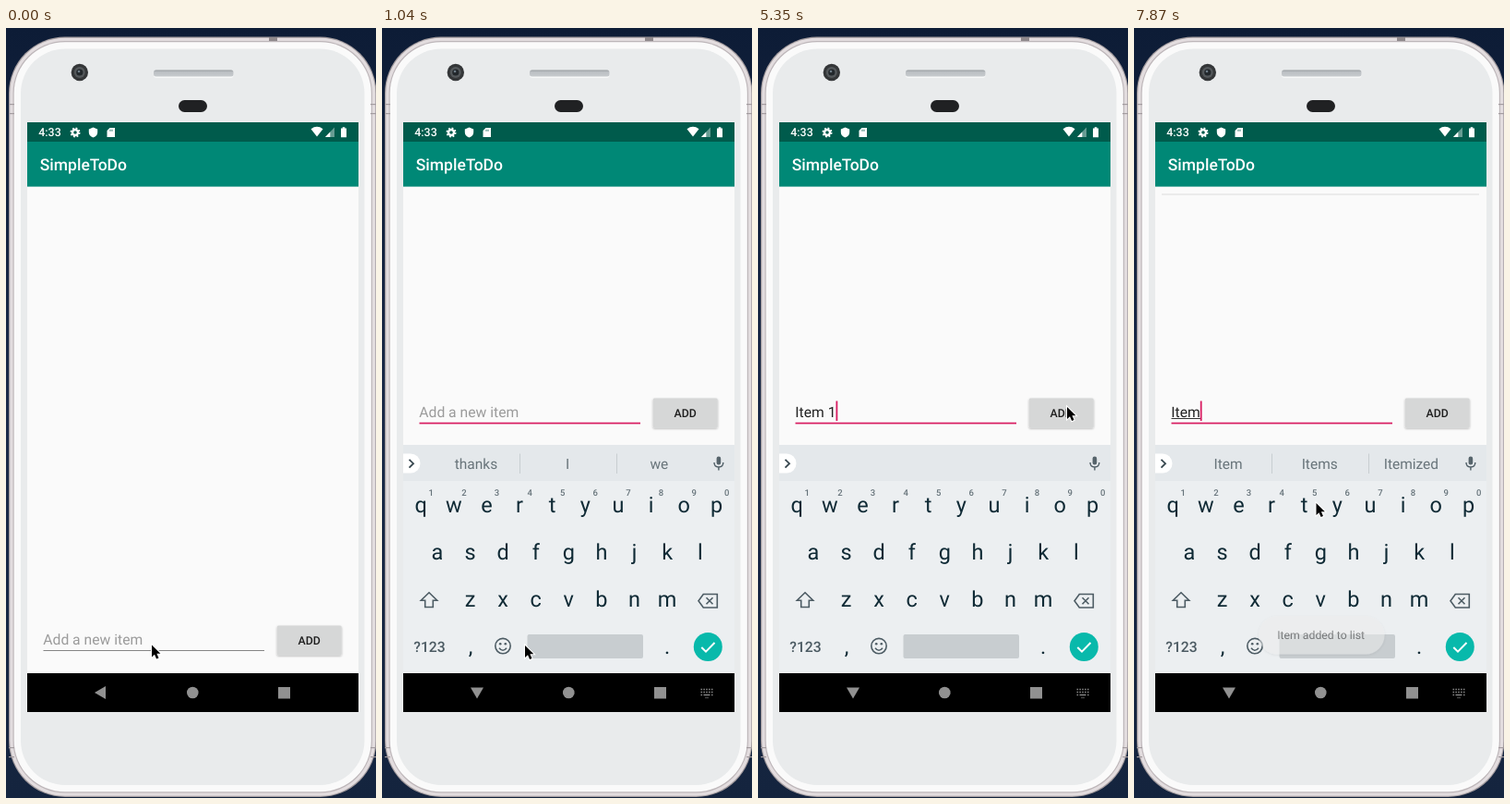
Animation of 401 by 833 pixels, one loop 8000 ms. Source, as an HTML page:

```html
<!DOCTYPE html>
<html lang="en">
<head>
<meta charset="utf-8">
<title>To-do app</title>
<style>
html, body { margin: 0; width: 100%; height: 100%; overflow: hidden; background: #13213b; }
svg { display: block; width: 401px; height: 833px; font-family: Roboto, sans-serif; }
text { white-space: pre; text-rendering: geometricPrecision; }
.mid { text-anchor: middle; }
.med { font-weight: 500; }
.key { font-size: 23.5px; fill: #0f2a35; }
.num { font-size: 9.5px; fill: #66737a; font-weight: 500; }
.sug { font-size: 15.5px; fill: #68747a; }
.line { fill: none; stroke: #4d5c64; stroke-width: 1.6; }
</style>
</head>
<body>
<svg viewBox="0 0 401 833">
  <defs>
    <linearGradient id="sky" x2="0" y2="1">
      <stop offset="0" stop-color="#0d1c36"/><stop offset=".5" stop-color="#1b2a48"/><stop offset="1" stop-color="#14243e"/>
    </linearGradient>
    <linearGradient id="slot" x2="0" y2="1">
      <stop offset="0" stop-color="#94999d"/><stop offset=".3" stop-color="#bcc0c4"/><stop offset="1" stop-color="#c6cacd"/>
    </linearGradient>
    <filter id="soft" x="-20%" y="-40%" width="140%" height="190%">
      <feDropShadow dx="0" dy="1" stdDeviation="1" flood-opacity=".3"/>
    </filter>
    <filter id="faint" x="-20%" y="-40%" width="140%" height="190%">
      <feDropShadow dx="0" dy="1" stdDeviation="1.5" flood-opacity=".14"/>
    </filter>
    <clipPath id="screen"><rect x="23" y="102" width="359" height="638"/></clipPath>
  </defs>

  <rect width="401" height="833" fill="url(#sky)"/>
  <g id="shell"></g>
  <g id="bands" fill="#a39c9f"></g>
  <rect x="285" y="10" width="9" height="4" fill="#8f898c"/>
  <circle cx="79.800" cy="48" r="9.200" fill="#343638"/>
  <circle cx="79.800" cy="48" r="6" fill="#54585b"/>
  <circle cx="79.800" cy="48" r="3.600" fill="#22272b"/>
  <circle cx="79" cy="47" r="1.300" fill="#6d7c86"/>
  <rect x="160" y="46" width="86.500" height="8" rx="3" fill="#f8f9f9"/>
  <rect x="160" y="45.500" width="86.500" height="7" rx="2.500" fill="url(#slot)"/>
  <rect x="187" y="78" width="31" height="13" rx="6.500" fill="#202123"/>

  <g clip-path="url(#screen)">
    <rect x="23" y="102" width="359" height="638" fill="#fafafa"/>
    <rect x="23" y="123" width="359" height="48.600" fill="#008876"/>
    <rect x="23" y="102" width="359" height="21" fill="#005b4c"/>
    <g fill="#fff">
      <text class="med" x="35.300" y="117.300" font-size="12.400">4:33</text>
      <circle cx="75" cy="113" r="3" fill="none" stroke="#fff" stroke-width="2.400"/>
      <circle cx="75" cy="113" r="4.600" fill="none" stroke="#fff" stroke-width="1.800" stroke-dasharray="1.800 1.813"/>
      <path d="M94.500 107.500l4.700 2v3.300q0 4.200-4.700 5.700q-4.700-1.500-4.700-5.700v-3.300z"/>
      <path d="M112.500 108h5.500v10h-8.500v-7z"/>
      <path d="M330.500 109.200q6.500-4.700 13 0l-6.500 8.300z"/>
      <path d="M356 107.500v10.500h-10z" opacity=".4"/><path d="M351.300 112.400v5.600h-5.300z"/>
      <path d="M363 108.500h1.700v-1.200h2.600v1.200h1.700v9.700h-6z"/>
      <text class="med" x="36.800" y="154" font-size="17.500">SimpleToDo</text>
    </g>
    <path d="M113 109.800v2M115 109.800v2" stroke="#005b4c" stroke-width=".8"/>
    <rect id="rule" x="30" y="179.500" width="344" height="1" fill="#dedede"/>

    <g id="form">
      <text id="entry" x="40.300" y="420.500" font-size="15.700"></text>
      <rect id="compose" x="40.500" y="422" height="1" fill="#333"/>
      <rect id="base" x="40.500" width="239.500"/>
      <rect id="caret" y="403.500" width="1.800" height="21.500" fill="#d81b60"/>
      <rect id="button" x="293.700" y="400.500" width="70" height="32" rx="1.500" filter="url(#soft)"/>
      <text class="mid med" x="328.700" y="420.600" font-size="12.300" fill="#1d1d1d">ADD</text>
    </g>

    <rect x="23" y="698" width="359" height="42"/>
    <g fill="#919191">
      <path id="back" d="M96 719l12-7v14z"/>
      <circle cx="202.300" cy="719" r="6.300"/>
      <rect x="295" y="713" width="13" height="12.500"/>
      <path id="down" d="M96 713.500h14l-7 12z"/>
    </g>
    <g id="dots" stroke="#858585" stroke-width="1.400">
      <path d="M345.500 715.500h13M345.500 718.500h13" stroke-dasharray="1.600 1.250"/>
      <path d="M345.500 721.500h1.600M348.500 721.500h7M357 721.500h1.500"/><path d="M350 724.500h4" opacity=".5"/>
    </g>

    <g id="board">
      <rect x="23" y="451" width="359" height="247" fill="#eceff1"/>
      <rect x="23" y="451" width="359" height="39" fill="#e4e8eb"/>
      <path d="M23 460.500h8a10.500 10.500 0 0 1 0 21h-8z" fill="#fff"/>
      <path class="line" d="M29.500 466.800l4.500 4.400l-4.500 4.400" style="stroke:#37474f;stroke-width:1.800"/>
      <path id="bars" d="M149.500 460.500v21.500M254.500 460.500v21.500" stroke="#c8ced1"/>
      <g id="words"></g>
      <rect x="362.600" y="463.500" width="4.600" height="9" rx="2.300" fill="#56646b"/>
      <path class="line" d="M360 470q0 5 4.900 5q4.900 0 4.900-5M364.900 475v3.500" style="stroke-width:1.400"/>
      <g id="keys"></g>
      <path class="line" d="M51 610.800l8.700 8.500h-4.400v7.200h-8.600v-7.200h-4.400z"/>
      <path class="line" d="M348.300 612.500h15v14.500h-15l-5.300-7.250zM351.500 616.200l7 7M358.500 616.200l-7 7"/>
      <text class="mid med" x="51.500" y="674.500" font-size="15.700" fill="#4b5a62">?123</text>
      <circle class="line" cx="131" cy="668.600" r="8.200"/>
      <path class="line" d="M127 670.800q4 5 8 0"/>
      <circle cx="128.200" cy="666.200" r="1.300" fill="#4d5c64"/><circle cx="133.800" cy="666.200" r="1.300" fill="#4d5c64"/>
      <rect x="157.500" y="656" width="125.500" height="26" rx="2" fill="#c8cdd0"/>
      <circle cx="353.300" cy="669.500" r="15.500" fill="#08b9ab"/>
      <path d="M346.300 670l4.700 4.700l9.500-9.700" fill="none" stroke="#fff" stroke-width="2"/>
    </g>

    <g id="toast">
      <rect x="135" y="636" width="136.500" height="41.500" rx="20.700" fill="#ededed" filter="url(#faint)"/>
      <text class="mid" x="202.600" y="660.800" font-size="12.250" fill="#222">Item added to list</text>
    </g>
  </g>

  <path id="mouse" d="M0 0v13l3-2.800l2.100 4.900l2.400-1l-2.100-4.800h4z" stroke="#fff" stroke-width="2" paint-order="stroke"/>
</svg>

<script>
const $ = id => document.getElementById(id);
const LOOP = 8000;

// Nested outlines of the phone body: inset, colour
$('shell').innerHTML = [[0, '#a29b9e'], [1.2, '#e3dddf'], [4.5, '#bdb6b9'], [5.7, '#fafafa'], [13, '#e9ebec']]
  .map(([d, c]) => `<rect x="${3 + d}" y="${9.5 + d}" width="${398.5 - 2 * d}" height="${822.5 - 2 * d}" rx="${61 - d}" fill="${c}"/>`)
  .join('');
$('bands').innerHTML = [82, 92, 778, 788]
  .map(y => `<rect x="3" y="${y}" width="6" height="1.2"/><rect x="395" y="${y}" width="6" height="1.2"/>`).join('');

const PITCH = 35.6;
const label = (cls, x, y, s) => `<text class="mid ${cls}" x="${x}" y="${y}">${s}</text>`;
const row = (cls, chars, x0, y) => [...chars].map((c, i) => label(cls, x0 + i * PITCH, y, c)).join('');
$('keys').innerHTML = row('key', 'qwertyuiop', 42.3, 523.6) + row('key', 'asdfghjkl', 60, 574.8)
  + row('key', 'zxcvbnm', 95.5, 626.4) + row('num', '1234567890', 53.3, 506)
  + label('key', 96, 677, ',') + label('key', 309, 677, '.');

const start = {
  mouse: [158, 667.5], focus: 0, caret: 0, lift: 0, slide: 0, fade: 0, text: '', composing: 0,
  words: 'thanks I we', press: 0, toast: 0, rule: 0
};
const typed = (text, words) => ({ text, words, composing: 1, caret: 1 });

// Each row holds from its time on
const steps = [
  [150, { mouse: [155, 668] }],
  [440, { focus: 1, caret: 1 }],
  [590, { lift: 1, slide: 22, fade: .4 }],
  [740, { slide: 7, fade: .82 }],
  [890, { slide: 0, fade: 1 }],
  [1040, { caret: 0 }],
  [1480, typed('I', "I I'm It")],
  [1630, typed('It', "It It's Its")],
  [2230, { caret: 0 }],
  [2520, typed('Ite', 'Ite Item Items')],
  [2820, typed('Item', 'Item Items Itemized')],
  [2960, { text: 'Item ', words: 'is in I', composing: 0 }],
  [3260, { text: 'Item 1', words: '' }],
  [3860, { caret: 0 }],
  [4310, { caret: 1, mouse: [160, 660] }],
  [4460, { mouse: [215, 590] }],
  [4610, { mouse: [305, 465] }],
  [4760, { mouse: [339, 415], caret: 0 }],
  [5060, { mouse: [336, 411] }],
  [5200, { mouse: [335, 410], caret: 1 }],
  [5490, { press: 1 }],
  [5640, { text: '', words: 'thanks I we', rule: 1, toast: .5 }],
  [5790, { press: 0, toast: 1, mouse: [310, 430] }],
  [5940, { mouse: [225, 496] }],
  [6090, { mouse: [197.5, 514], caret: 0 }],
  [6690, { caret: 1 }],
  [7130, typed('I', "I I'm It")],
  [7280, typed('It', "It It's Its")],
  [7570, typed('Ite', 'Ite Item Items')],
  [7720, typed('Item', 'Item Items Itemized')],
  [7870, { toast: .5 }]
];

const set = (id, attrs) => { for (const k in attrs) $(id).setAttribute(k, attrs[k]); };
const show = (id, alpha) => set(id, { opacity: +alpha });

function draw(s) {
  const entry = $('entry');
  entry.textContent = s.text || 'Add a new item';
  set('entry', { fill: s.text ? '#222' : '#9b9b9b' });
  const width = s.text ? entry.getComputedTextLength() : 0;
  set('form', { transform: `translate(0 ${s.lift ? 0 : 246})` });
  set('base', s.focus ? { y: 426.7, height: 1.7, fill: '#d81b60' } : { y: 427, height: 1, fill: '#858585' });
  set('compose', { width });
  show('compose', s.composing);
  set('caret', { x: 40.3 + width });
  show('caret', s.caret);
  set('button', { fill: s.press ? '#bcbdbd' : '#d6d7d7' });
  show('rule', s.rule);

  show('back', !s.lift);
  show('down', s.lift);
  show('dots', s.lift);
  set('board', { transform: `translate(0 ${s.slide})` });
  show('board', s.fade);
  show('bars', s.words !== '');
  $('words').innerHTML = s.words.split(' ').map((w, i) => label('sug', 102 + i * 99.2, 476.8, w)).join('');

  show('toast', s.toast);
  set('mouse', { transform: `translate(${s.mouse})` });
}

let last = -1;
function tick() {
  const t = performance.now() % LOOP;
  const past = steps.filter(([at]) => at <= t);
  if (past.length !== last) {
    last = past.length;
    draw(Object.assign({}, start, ...past.map(([, change]) => change)));
  }
  requestAnimationFrame(tick);
}
tick();
</script>
</body>
</html>
```
